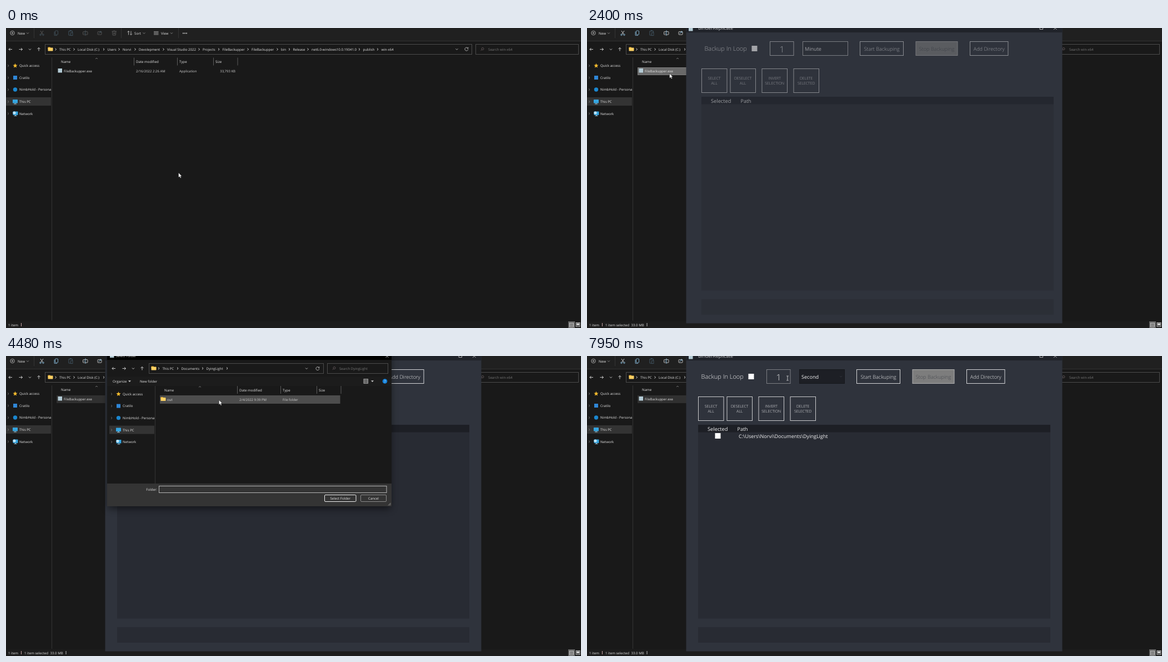
Write an HTML page that moves like this. It is 1035x541 px and loops after 8 s.

```html
<!DOCTYPE html>
<html lang="en">
<head>
<meta charset="utf-8">
<title>Folder backup demo</title>
<style>
html, body { margin: 0; width: 100%; height: 100%; overflow: hidden; background: #191919; }
svg { display: block; width: 100%; height: 100%; }
text { font-family: "Open Sans", "Noto Sans", sans-serif; white-space: pre; text-rendering: geometricPrecision; }
</style>
</head>
<body>
<svg id="stage" viewBox="0 0 1035 541" xmlns="http://www.w3.org/2000/svg"></svg>
<script>
const LOOP = 8000;
const stage = document.getElementById('stage');

// --- markup helpers ---
const text = (x, y, s, size = 6.1, attrs = '') => `<text x="${x}" y="${y}" font-size="${size}" ${attrs}>${s}</text>`;
const mid = (x, y, s, size, attrs = '') => text(x, y, s, size, `text-anchor="middle" ${attrs}`);
const rect = (x, y, w, h, fill, attrs = '') => `<rect x="${x}" y="${y}" width="${w}" height="${h}" fill="${fill}" ${attrs}/>`;
const box = (x, y, w, h, stroke, fill = 'none', attrs = '') => rect(x + .5, y + .5, w - 1, h - 1, fill, `stroke="${stroke}" ${attrs}`);
const line = (d, stroke = '#d8d8d8', width = .9, attrs = '') => `<path d="${d}" fill="none" stroke="${stroke}" stroke-width="${width}" ${attrs}/>`;
const circle = (x, y, r, fill, attrs = '') => `<circle cx="${x}" cy="${y}" r="${r}" fill="${fill}" ${attrs}/>`;
const group = (id, body, attrs = '') => `<g id="${id}" ${attrs}>${body}</g>`;
const at = (x, y, body) => `<g transform="translate(${x} ${y})">${body}</g>`;
const right = (x, y, c, w) => line(`M${x - 1} ${y - 1.9}l2 1.9l-2 1.9`, c, w);
const down = (x, y, c, w) => line(`M${x - 2} ${y - 1}l2 2l2 -2`, c, w);

// --- shared pieces of the file views ---
const folder = (x, y) => rect(x, y, 4.5, 3, '#e0a526', 'rx=".6"') + rect(x, y + 1, 9, 6, '#fbd063', 'rx=".7"');
const monitor = (x, y) => rect(x, y, 9, 6.4, '#35a5e0', 'rx=".6"') + rect(x + 3.6, y + 6.4, 1.8, 1.2, '#8fb6c9') + rect(x + 2, y + 7.5, 5, .9, '#9cc4d8');
const star = (x, y) => {
  let d = '';
  for (let i = 0; i < 10; i++) {
    const a = i * Math.PI / 5, r = i % 2 ? 1.9 : 4.3;
    d += `${i ? 'L' : 'M'}${(x + r * Math.sin(a)).toFixed(2)} ${(y - r * Math.cos(a)).toFixed(2)}`;
  }
  return `<path d="${d}Z" fill="#f8bd2e"/>`;
};

function sidebar() {
  const items = ['Quick access', 'Cratilo', 'NimbHold - Personal', 'This PC', 'Network'];
  return rect(0, 125, 81, 15, '#333') +
    items.map((s, i) => right(4, 68 + 21.6 * i, '#8a8a8a', .7) + text(24, 70.2 + 21.6 * i, s)).join('') +
    star(16.5, 68) + rect(13, 86, 7, 7, '#2f86d6') + circle(16.5, 111, 3.7, '#1b87cf') + monitor(12, 129) +
    monitor(12.5, 150.5) + circle(15, 153, 2.6, '#bfe3f5') + rect(82, 53, 1, 475, '#343434');
}

function columns() {
  return [[99, 'Name'], [234, 'Date modified'], [312, 'Type'], [377, 'Size']].map(([x, s]) => text(x, 63, s, 6.15)).join('') +
    [230, 308, 373, 416.5].map(x => rect(x, 53.5, 1, 14, '#5c5c5c')).join('') + line('M161 55.8l2 -1.7l2 1.7', '#999', .7);
}

function navArrows() {
  return line('M11 38.5h-6m2.5 -2.5l-2.5 2.5l2.5 2.5') + line('M23.5 38.5h6m-2.5 -2.5l2.5 2.5l-2.5 2.5') +
    down(43, 38.5) + line('M59 41.5v-6m-2.5 2.5l2.5 -2.5l2.5 2.5') + folder(75.5, 34.5);
}

const crumbs = (y, list) => list.map(([x, s]) => right(x - 6.5, y - 2.2, '#ddd', 1) + text(x, y, s)).join('');
const refresh = (x, y) => line(`M${x + 2.4} ${y - 1.6}a3 3 0 1 0 .5 2M${x + 2.9} ${y - 3.3}v2.2h-2.2`, '#ccc', .8);
const lens = (x, y) => circle(x, y, 2, 'none', 'stroke="#75686b" stroke-width=".7"') + line(`M${x - 1.4} ${y + 1.4}l-2 2`, '#75686b', .7);
const appIcon = (x, y) => rect(x, y, 7.5, 7.5, '#b4cbd5');

// --- explorer ---
function toolIcons() {
  return line('M62 5l4.2 6.6M67 5l-4.2 6.6') + circle(62, 12.2, 1.3, 'none', 'stroke="#8fc4e6" stroke-width=".8"') +
    circle(67, 12.2, 1.3, 'none', 'stroke="#8fc4e6" stroke-width=".8"') +
    box(88, 4.5, 6, 8, '#8fc4e6', 'none', 'rx="1" stroke-width=".8"') + line('M87 6.5v6.8h5', '#8fc4e6', .8) +
    box(138, 6, 9.5, 6.5, '#ddd', 'none', 'rx="1" stroke-width=".8"') + line('M143 4v10M140 9.3h2', '#8fc4e6', .8) +
    box(164.5, 6, 8, 6.5, '#ddd', 'none', 'rx="1" stroke-width=".8"') + line('M167 10.5q.5 -3.5 4.5 -3.5m-1.7 -1.7l1.8 1.7l-1.8 1.7', '#8fc4e6', .8) +
    line('M190.5 6h8.5M193 6q1.7 -2.6 3.5 0M191.5 6l.7 7h5l.7 -7M194 8v3.2m1.6 0v-3.2');
}

function explorer() {
  const path = [[96, 'This PC'], [129, 'Local Disk (C:)'], [182.5, 'Users'], [210, 'Norvi'], [239, 'Devolepment'],
    [290, 'Visual Studio 2022'], [354, 'Projects'], [389.5, 'FileBackupper'], [442, 'FileBackupper'], [495, 'bin'],
    [516.5, 'Release'], [550, 'net6.0-windows10.0.19041.0'], [642.5, 'publish'], [675.5, 'win-x64']];
  return rect(0, 0, 1035, 541, '#191919') + rect(0, 0, 1035, 23, '#202020') + rect(0, 23, 1035, 1, '#333') +
    circle(11.5, 9, 3.7, 'none', 'stroke="#ddd" stroke-width=".7"') + line('M11.5 7.2v3.6M9.7 9h3.6', '#ddd', .7) +
    text(21, 11.5, 'New', 6.3) + down(39, 9.3, '#aaa', .7) + rect(50, 0, 1, 18, '#343434') + rect(207, 0, 1, 18, '#343434') +
    rect(310, 0, 1, 18, '#343434') + group('tools', toolIcons()) +
    line('M113 5.5h6.5v7.5h-6.5zM115 4.5h2.5', '#445866', .9) + box(116, 8, 4.5, 6, '#445866', '#202020', 'stroke-width=".8"') +
    line('M220.5 12.5v-7m-2 2l2 -2l2 2M225 5.5v7m-2 -2l2 2l2 -2', '#ccc', .8) + text(231, 11.5, 'Sort', 6.2) + down(248.5, 9.3, '#aaa', .7) +
    line('M266 6.5h8.5M266 8.3h8.5M266 10.1h8.5M266 11.9h8.5', '#bbb', .7) + text(279, 11.5, 'View', 6.2) + down(298, 9.3, '#aaa', .7) +
    [319, 322, 325].map(x => circle(x, 9.5, .9, '#eee')).join('') +
    navArrows() + box(70, 29, 769, 19, '#4b4b4b') + crumbs(40.7, path) + down(811.5, 38.3, '#ccc', .8) + refresh(829, 38) +
    box(845, 29, 186, 19, '#4b4b4b') + lens(858, 37.5) + text(868, 40.5, 'Search win-x64', 6.2, 'fill="#777"') +
    columns() + group('row', '') + appIcon(93.5, 73) +
    text(104, 80, 'FileBackupper.exe', 6) + text(234, 80, '2/16/2022 2:26 AM', 6, 'fill="#ccc"') +
    text(312, 80, 'Application', 6, 'fill="#ccc"') + text(413, 80, '33,793 KB', 6, 'fill="#ccc" text-anchor="end"') + sidebar() +
    rect(0, 529, 1035, 12, '#1c1c1c') + text(4, 537.6, '1 item') + rect(27, 532, 1, 6, '#c9a6a6') +
    group('picked', text(33, 537.6, '1 item selected') + text(79.5, 537.6, '33.0 MB') + rect(107.5, 532, 1, 6, '#bbb')) +
    rect(1012, 529, 12, 12, '#666') + box(1014, 531.5, 8, 8, '#ddd', 'none', 'stroke-width=".7"') +
    line('M1014.5 534h7M1014.5 536.5h7', '#ddd', .6) + box(1025.5, 531, 8, 8, '#ddd', 'none', 'stroke-width=".8"') + rect(1027, 532.5, 5, 4, '#ccc');
}

// --- backup window ---
function backupContent() {
  const button = (x, w, s) => box(x, 24, w, 26, '#d5d6d8') + mid(x + w / 2, 40.5, s, 9.15, 'font-weight="300"');
  const tall = (x, a, b) => box(x, 73, 46.5, 44, '#c9cacc') + mid(x + 23.2, 93, a, 6.9, 'font-weight="300"') + mid(x + 23.2, 102.4, b, 6.9, 'font-weight="300"');
  return text(205.5, 41.2, 'Backup In Loop', 11, 'font-weight="300"') + rect(290.5, 32, 10, 10, '#fff') +
    box(323, 24, 43.5, 26, '#c4c5c8', 'none', 'id="countBox"') + mid(345, 43.6, '1', 15.5, 'font-weight="300"') +
    box(382, 24, 82, 26, '#b5b6b9', '#2b2e36', 'id="combo"') + text(386, 40.6, 'Minute', 9.1, 'id="unit"') + down(457, 37, '#3a3d45', .7) +
    button(485, 79, 'Start Backuping') + box(585.5, 24, 76, 26, '#b0b0b0', '#7d7d7d') +
    mid(623.5, 40.5, 'Stop Backuping', 9.15, 'font-weight="300" fill="#42454b"') + button(683, 69.5, 'Add Directory') +
    tall(200, 'SELECT', 'ALL') + tall(251.5, 'DESELECT', 'ALL') + tall(308.5, 'INVERT', 'SELECTION') + tall(365.5, 'DELETE', 'SELECTED') +
    rect(200, 124, 634, 349.5, '#282b33') + rect(200, 124, 634, 13.5, '#1d1f25') +
    text(217, 134.8, 'Selected', 9.3) + text(270.5, 134.8, 'Path', 9) + rect(200, 489, 634, 28, '#282b33') +
    group('entry', rect(230.5, 139, 10, 10, '#fff') + text(273, 147.6, 'C:\\Users\\Norvi\\Documents\\DyingLight', 9));
}

function backupWindow() {
  return rect(178.5, -8, 677, 540.5, '#2f333c') + rect(178.5, -8, 677, 16, '#20232a') + appIcon(183, -2) +
    text(200, 3.2, 'BinderReplicate', 8.6, 'fill="#c8c9cb"') + line('M815 -2v4.5h5.5v-4.5', '#ccc', .8) +
    line('M840 -2.5l5.5 5.5M845.5 -2.5l-5.5 5.5', '#ccc', .8) + group('content', backupContent());
}

const units = ['Second', 'Minute', 'Hour', 'Day'];
const popup = () => box(382.5, 49.5, 81.5, 64, '#4a4d55', '#23262d') + rect(383, 50, 80.5, 16, '#454a55', 'id="hover"') +
  units.map((s, i) => text(387, 61.2 + 16 * i, s, 8.6)).join('');

// --- folder dialog ---
function dialogFull() {
  return rect(182, -7, 512, 278, '#191919') + rect(182, -7, 512, 14, '#000') + appIcon(187, -4.5) +
    text(197.5, 2.2, 'Select Folder', 6.2) + line('M683.5 -2l5 5M688.5 -2l-5 5', '#ccc', .8) +
    at(186, -16, navArrows()) + box(257, 13, 315, 19, '#4b4b4b') +
    crumbs(24.6, [[281.5, 'This PC'], [315.5, 'Documents'], [360.5, 'DyingLight']]) + right(398, 22.3, '#ddd', 1) +
    down(541, 22.5, '#ccc', .8) + refresh(561, 22.5) + box(578, 13, 110, 19, '#4b4b4b') + lens(591, 21.5) +
    text(600, 24.5, 'Search DyingLight', 6.1, 'fill="#777"') + rect(182, 37, 512, 17, '#1c1c1c') +
    text(192, 47.6, 'Organize') + `<path d="M220 44.2h5l-2.5 2.8z" fill="#ccc"/>` + text(241, 47.6, 'New folder') +
    box(643.5, 41, 8.5, 9, '#bbb', '#444', 'stroke-width=".8"') + line('M644 43.5h7.5M644 45.5h7.5M644 47.5h7.5', '#bbb', .6) +
    `<path d="M657 44.2h5l-2.5 2.8z" fill="#ccc"/>` + circle(682, 45.5, 4.3, '#1583dc') + mid(682, 47.8, '?', 6.2, 'fill="#fff"') +
    at(186, .6, columns()) + rect(277, 71, 324.5, 15, '#4d4d4d', 'id="outRow"') + folder(278.5, 74) + text(290, 80.8, 'out') +
    text(420, 80.8, '2/4/2022 9:39 PM', 6, 'fill="#ccc"') + text(498, 80.8, 'File folder', 6, 'fill="#ccc"') +
    `<g clip-path="url(#pane)">${at(186, .6, sidebar())}</g>` +
    rect(182, 230, 512, 41, '#343434') + text(272, 243, 'Folder:', 6.1, 'text-anchor="end"') + box(275, 234, 410.5, 13, '#b5b5b5', '#343434') +
    box(573, 250, 57.5, 13, '#eee', '#343434', 'rx="1.5" id="ok"') + mid(601.7, 258.8, 'Select Folder', 6.1) +
    box(638, 250, 47, 13, '#8a8a8a', '#343434', 'rx="1.5"') + mid(661.5, 258.8, 'Cancel', 6.1) +
    line('M688 269.5l4.5 -4.5M690.3 269.5l2.2 -2.2', '#aaa', .8);
}

const dialogBlank = () => rect(182, -7, 512, 278, '#000') + rect(182, 9, 512, 221, '#fff') + appIcon(187, -4.5) +
  text(197.5, 2.2, 'Select Folder', 6.2) + line('M683.5 -2l5 5M688.5 -2l-5 5', '#ccc', .8) +
  [[252, 235, 20, 8], [275, 234, 410.5, 12], [573, 250, 58, 13], [638, 250, 47, 13], [685, 262, 9, 9]]
    .map(b => rect(...b, '#fff', 'opacity=".85"')).join('');

stage.innerHTML = `<defs><filter id="soft" x="-10%" y="-15%" width="120%" height="130%"><feGaussianBlur stdDeviation="7"/></filter>
  <clipPath id="pane"><rect x="182" y="54" width="87" height="176"/></clipPath></defs>` +
  `<g fill="#e4e4e4">${explorer()}</g>` + group('win', backupWindow(), 'fill="#f2f2f3"') +
  group('popup', popup(), 'fill="#eee"') +
  group('dialog', rect(184, -2, 508, 277, '#000', 'opacity=".55" filter="url(#soft)"') + group('full', dialogFull()) + group('blank', dialogBlank()), 'fill="#e4e4e4"') +
  group('busy', circle(155.3, 82, 3.4, 'none', 'stroke="#1c9cf0" stroke-width="1.7"')) +
  group('arrow', '<path d="M0 0V8.6L2 6.8L3.4 9.8L4.9 9.1L3.5 6.2H6.1Z" fill="#fff" stroke="#111" stroke-width=".5"/>') +
  group('beam', line('M-1.8 -4h1.2q.6 0 .6 .6q0 -.6 .6 -.6h1.2M0 -3.4v6.8M-1.8 4h1.2q.6 0 .6 -.6q0 .6 .6 .6h1.2', '#e8e8e8', .8));

const el = {};
stage.querySelectorAll('[id]').forEach(n => { el[n.id] = n; });

// --- motion ---
const ramp = (t, a, b) => Math.min(1, Math.max(0, (t - a) / (b - a)));
const smooth = p => p * p * (3 - 2 * p);
const easeOut = p => 1 - (1 - p) ** 3;
const show = (node, on) => { node.style.display = on ? '' : 'none'; };
const set = (node, attrs) => { for (const k in attrs) node.setAttribute(k, attrs[k]); };
const zoom = (x, y, s) => `translate(${x} ${y}) scale(${s}) translate(${-x} ${-y})`;

// time, x, y of the pointer
const track = [[20, 310.5, 261], [860, 151, 92], [1060, 148.5, 82], [2500, 148.5, 82], [2900, 218, 124], [3720, 701, 45],
  [3820, 701, 45], [4470, 383, 79], [4560, 390, 88], [5340, 602, 254], [5500, 602, 254], [6280, 373, 112],
  [6540, 395, 51], [6700, 402, 38], [6840, 402, 38], [7140, 418, 56], [7600, 418, 56], [7940, 361, 40]];

function pointer(t) {
  const i = track.findIndex(k => k[0] > t);
  if (i === 0) return track[0].slice(1);
  if (i < 0) return track[track.length - 1].slice(1);
  const a = track[i - 1], b = track[i], p = smooth(ramp(t, a[0], b[0]));
  return [a[1] + (b[1] - a[1]) * p, a[2] + (b[2] - a[2]) * p];
}

function draw(t) {
  const [x, y] = pointer(t);
  const inside = (l, top, r, b) => x > l && x < r && y > top && y < b;

  // explorer selection
  const selected = t >= 1260, focused = selected && t < 2700;
  const tone = focused ? '#696969' : selected ? '#303030' : inside(91, 71, 415, 85) ? '#4d4d4d' : 'none';
  el.row.innerHTML = box(91, 71, 324, 14, focused ? '#7d7d7d' : tone, tone);
  set(el.tools, { opacity: selected ? 1 : .32 });
  show(el.picked, selected);
  show(el.busy, t >= 1590 && t < 2300);

  // backup window opens, then its content slides in
  show(el.win, t >= 2270);
  const open = easeOut(ramp(t, 2250, 2395));
  set(el.win, { opacity: open, transform: zoom(517, 262, .9 + .1 * open) });
  const slide = 24 * (1 - ramp(t, 2290, 2850)) ** 6.3;
  set(el.content, { opacity: .25 + .75 * ramp(t, 2290, 2560), transform: `translate(${slide.toFixed(2)} 0)` });
  show(el.entry, t >= 5610);

  // folder dialog
  const fadeIn = t < 3866 ? .16 : .85 + .15 * ramp(t, 3866, 3960);
  const leave = ramp(t, 5400, 5540);
  const size = t < 3866 ? .87 : .98 + .02 * ramp(t, 3866, 3960);
  show(el.dialog, t >= 3790 && leave < 1);
  show(el.blank, t < 3866);
  show(el.full, t >= 3866);
  set(el.dialog, { opacity: fadeIn * (1 - leave), transform: zoom(403, 109, size - .1 * leave) });
  show(el.outRow, inside(277, 71, 601, 86));
  set(el.ok, { fill: inside(573, 250, 630, 263) ? '#555' : '#343434' });

  // unit list
  const listed = t >= 6790 && t < 7600, done = t >= 7600;
  show(el.popup, listed);
  const item = t >= 7205 ? 0 : 1;
  set(el.hover, { y: 50 + 16 * item });
  el.unit.textContent = done ? units[0] : units[1];
  set(el.combo, { fill: done || listed ? '#1d1f25' : '#2b2e36', stroke: done || listed ? '#15171b' : '#b5b6b9' });

  const typing = t >= 7600 && inside(323, 24, 366, 50);
  set(el.countBox, { stroke: typing ? '#7c7e83' : '#c4c5c8' });
  show(el.arrow, !typing);
  show(el.beam, typing);
  set(typing ? el.beam : el.arrow, { transform: `translate(${x.toFixed(2)} ${y.toFixed(2)})` });
}

const start = performance.now();
function tick() {
  draw((performance.now() - start) % LOOP);
  requestAnimationFrame(tick);
}
tick();
</script>
</body>
</html>
```
